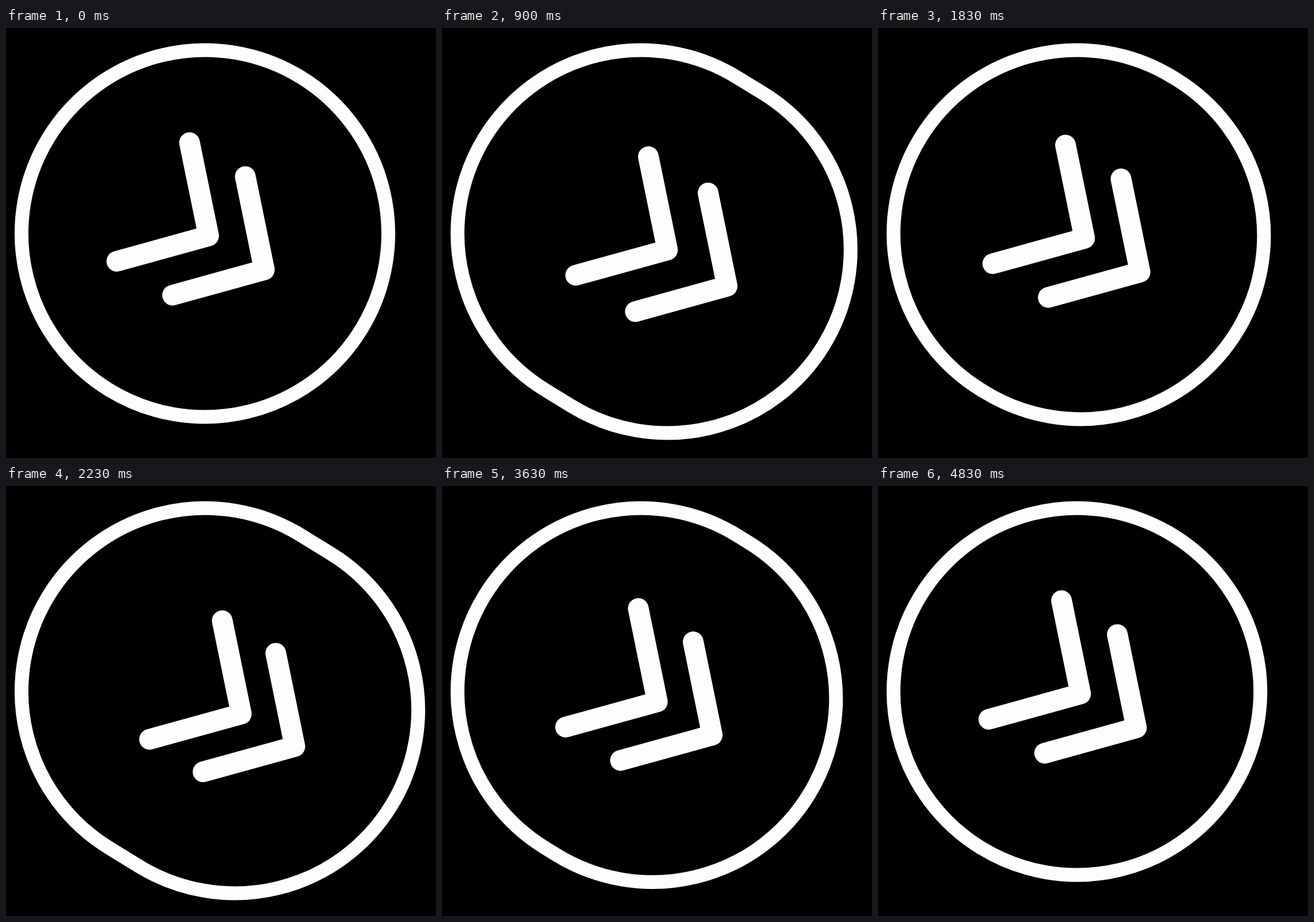
Recreate the animation shown at these times as an HTML page. Size 748 by 748 pixels, loop 5110 ms.

```html
<!DOCTYPE html>
<html lang="en">
<head>
<meta charset="utf-8">
<title>Arrow in ring</title>
<style>
  html, body { margin: 0; width: 100%; height: 100%; overflow: hidden; background: #000; }
  svg { display: block; width: 100%; height: 100%; }
  path { fill: none; stroke: #fdfdfd; stroke-linecap: round; stroke-linejoin: round; }
  #ring { stroke-width: 24; }
  .chevron { stroke-width: 36; }
</style>
</head>
<body>
<svg viewBox="0 0 748 748">
  <g transform="translate(346 357.5) rotate(31.5)">
    <path id="ring"/>
    <path id="back" class="chevron" d="M-105.4 -120.8 L7.7 .2 L-105.4 121.2"/>
    <path id="front" class="chevron" d="M8.1 -121.2 L121.2 -.2 L8.1 120.8"/>
  </g>
</svg>
<script>
  const LOOP = 5110, CYCLE = 1700, FPS = 30, R = 319;
  const PEAK = 22;
  const [ring, back, front] = ['ring', 'back', 'front'].map(id => document.getElementById(id));

  // cubic-bezier(.35, 0, .34, 1)
  function ease(x) {
    if (x <= 0) return 0;
    if (x >= 1) return 1;
    let lo = 0, hi = 1;
    for (let i = 0; i < 24; i++) {
      const t = (lo + hi) / 2, u = 1 - t;
      if (3 * u * u * t * .35 + 3 * u * t * t * .34 + t * t * t < x) lo = t;
      else hi = t;
    }
    return lo * lo * (3 - 2 * lo);
  }

  // Push out until PEAK, then return by end.
  const push = (f, end) => f < PEAK ? ease(f / PEAK) : 1 - ease((f - PEAK) / (end - PEAK));

  // The picture is held for 30 and 70 ms in turn.
  function heldFrame(ms) {
    const t = ms % LOOP % CYCLE;
    return Math.floor(t / 100) * FPS / 10 + (t % 100 >= 30 ? 1 : 0);
  }

  function draw(ms) {
    const f = heldFrame(ms);
    const late = push(f, 44);
    const arc = `A${R} ${R} 0 0 0`;
    const k = 65.7 * late;
    ring.setAttribute('d', `M0 ${-R} ${arc} 0 ${R} H${k} ${arc} ${k} ${-R} Z`);
    back.setAttribute('transform', `translate(${71.8 * push(f, 38)} 0)`);
    front.setAttribute('transform', `translate(${66.9 * late} 0)`);
  }

  const start = performance.now();
  function tick() {
    draw(performance.now() - start);
    requestAnimationFrame(tick);
  }
  tick();
</script>
</body>
</html>
```
